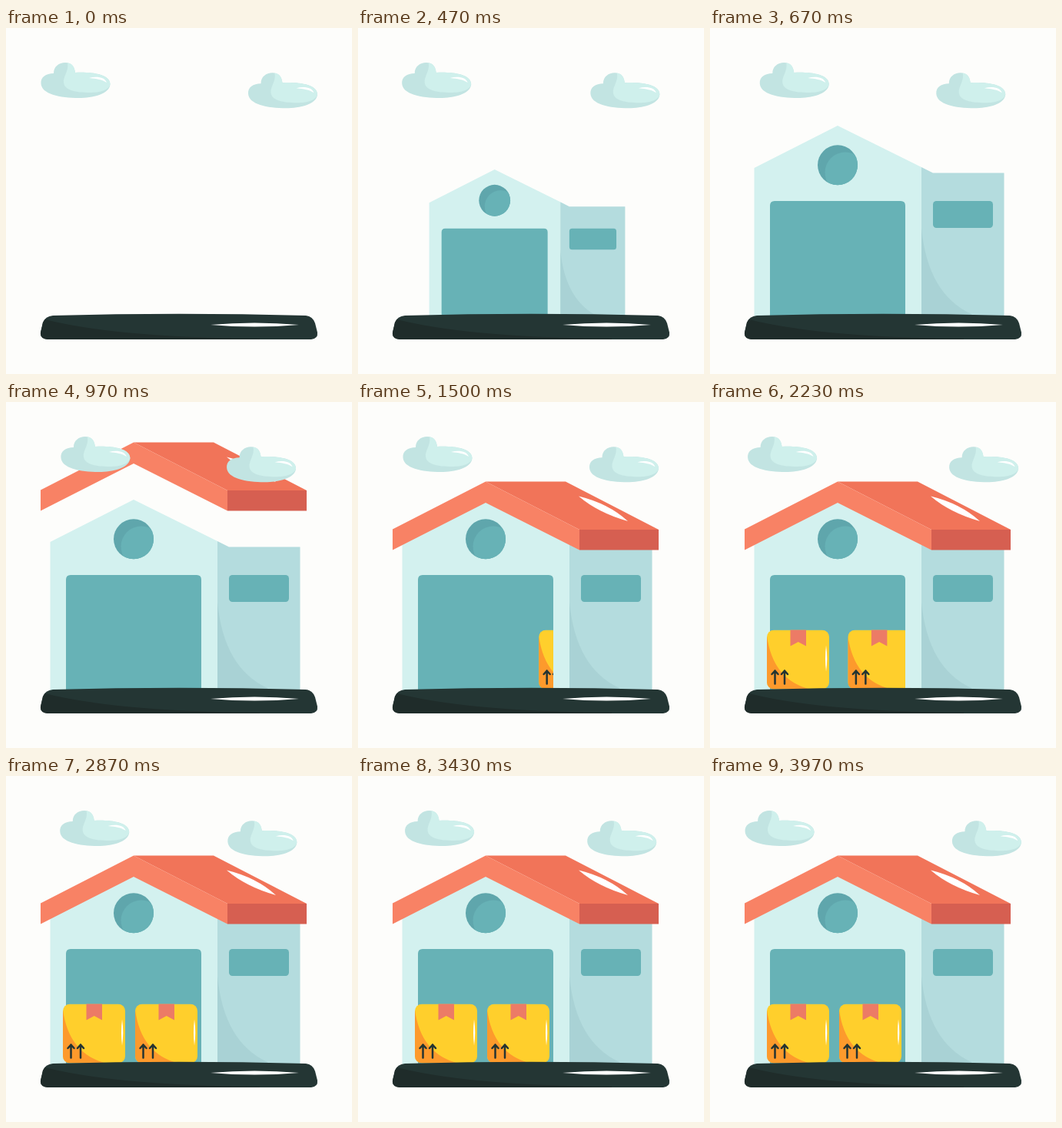
Write an HTML page that moves like this. It is 450 px wide and 450 px high and loops after 4010 ms.

```html
<!DOCTYPE html>
<html lang="en">
<head>
<meta charset="utf-8">
<title>Warehouse</title>
<style>
  html, body { margin: 0; width: 100%; height: 100%; overflow: hidden; background: #fdfdfb; }
  svg { display: block; width: 100%; height: 100%; }
</style>
</head>
<body>
<svg viewBox="0 0 450 450">
  <defs>
    <clipPath id="doorway"><rect width="254" height="450"/></clipPath>
    <clipPath id="boxShape"><rect width="81" height="77" rx="9"/></clipPath>
    <clipPath id="porthole"><circle cx="166" cy="178.300" r="26"/></clipPath>
    <path id="groundShape" d="M61 374Q225 369.500 390 374Q399 375 402 384L405 396Q406 404 397 405H54Q44 404 45 396L48 383Q51 375 61 374Z"/>
    <clipPath id="groundClip"><use href="#groundShape"/></clipPath>

    <g id="cloud">
      <path fill="#c2e4e2" d="M45.500 72C45 64 52 59 62 59C62 50 69 45 77 45C85 45 89 50 90 58C108 57 135 59 135.500 73C135 86 112 91 95 91C70 91 46 86 45.500 72Z"/>
      <path fill="#cff0ec" d="M80 45.200C86 46 89 50 90 58C108 57 135 59 135.500 73C134 81 122 84 109 84C91 84 76 81 75 71C74 63 82 56 80 45.200Z"/>
      <path fill="#fff" d="M108 65C118 62 129 64 131 71C125 67 118 66 108 65Z"/>
    </g>

    <g id="box">
      <g clip-path="url(#boxShape)">
        <rect width="81" height="77" fill="#ffcf2c"/>
        <path fill="#fd9a2c" d="M0 8Q8 65 56 77H0Z"/>
      </g>
      <path fill="#ec7b66" d="M30.500 0H51V21L40.750 15.500L30.500 21Z"/>
      <path fill="#fff" d="M77 20Q79.500 37 77 54Q75 37 77 20Z"/>
      <path fill="none" stroke="#243432" stroke-width="2.500" stroke-linecap="round" stroke-linejoin="round"
        d="M10.500 70V53M6.500 57.500L10.500 53L14.500 57.500M23 70V53M19 57.500L23 53L27 57.500"/>
    </g>
  </defs>

  <g id="house">
    <path fill="#b4dcde" d="M275 181L290 188.500H382.500V391H275Z"/>
    <path fill="#a9d2d5" d="M275 260Q283 346 340 372V391H275Z"/>
    <path fill="#d3f1ef" d="M57.500 182L166 127L275 181V391H57.500Z"/>
    <g clip-path="url(#porthole)">
      <rect x="139" y="151" width="54" height="54" fill="#5fa6ac"/>
      <circle cx="176" cy="188" r="26.500" fill="#67b2b6"/>
    </g>
    <path fill="#67b2b6" d="M78 391V231Q78 225 84 225H248Q254 225 254 231V391Z"/>
    <rect x="290" y="225" width="78" height="35" rx="4.500" fill="#67b2b6"/>
  </g>

  <g clip-path="url(#doorway)">
    <use id="boxA" href="#box"/>
    <use id="boxB" href="#box"/>
  </g>

  <g id="roof">
    <path fill="#f17459" d="M166 103.500H270L391 166H288Z"/>
    <path fill="#f88265" d="M45 165.500L166 103.500L288 166V192.500L166 131L45 192.500Z"/>
    <path fill="#d65f51" d="M288 166H391V192.500H288Z"/>
    <path fill="#fff" d="M287 122.500Q326 132 351 155Q312 144 287 122.500Z"/>
  </g>

  <use href="#groundShape" fill="#243634"/>
  <path clip-path="url(#groundClip)" fill="#1f2c2a" d="M40 376Q130 402 330 404V410H40Z"/>
  <path fill="#fff" d="M266 386Q323 381 381 386Q323 391 266 386Z"/>

  <use id="cloudA" href="#cloud"/>
  <use id="cloudB" href="#cloud"/>
</svg>
<script>
const LOOP = 4010;
const STEP = 1000 / 30;
const STEPS = 120;
const $ = id => document.getElementById(id);
const mix = (a, b, u) => a + (b - a) * u;

// Smooth progress from 0 to 1 between two steps
function ease(n, start, end) {
  const u = Math.min(1, Math.max(0, (n - start) / (end - start)));
  return u * u * (3 - 2 * u);
}

const place = (id, x, y) => $(id).setAttribute('transform', `translate(${x} ${y})`);

function scaleAbout(id, x, y, s, dy = 0) {
  const el = $(id);
  el.style.display = s > 0.001 ? '' : 'none';
  el.setAttribute('transform', `translate(${x} ${y + dy}) scale(${s}) translate(${-x} ${-y})`);
}

function draw(n) {
  scaleAbout('house', 220, 391, ease(n, 0, 20));
  scaleAbout('roof', 218, 148, ease(n, 20, 25), -62 * (1 - ease(n, 25, 40)));

  place('boxA', mix(265, 74, ease(n, 40, 60)), 296.5);
  place('boxB', mix(355, 168, ease(n, 50, 70)), 296.5);

  const drift = ease(30 - Math.abs(n % 60 - 30), 0, 30);
  place('cloudA', 26 * drift, 0);
  place('cloudB', 269.5 - 28 * drift, 13.3);
}

// The motion advances 30 times a second; step starts are rounded to 10 ms
function tick() {
  const t = performance.now() % LOOP;
  draw(Math.min(STEPS - 1, Math.floor((t + 4) / STEP)));
  requestAnimationFrame(tick);
}
tick();
</script>
</body>
</html>
```
